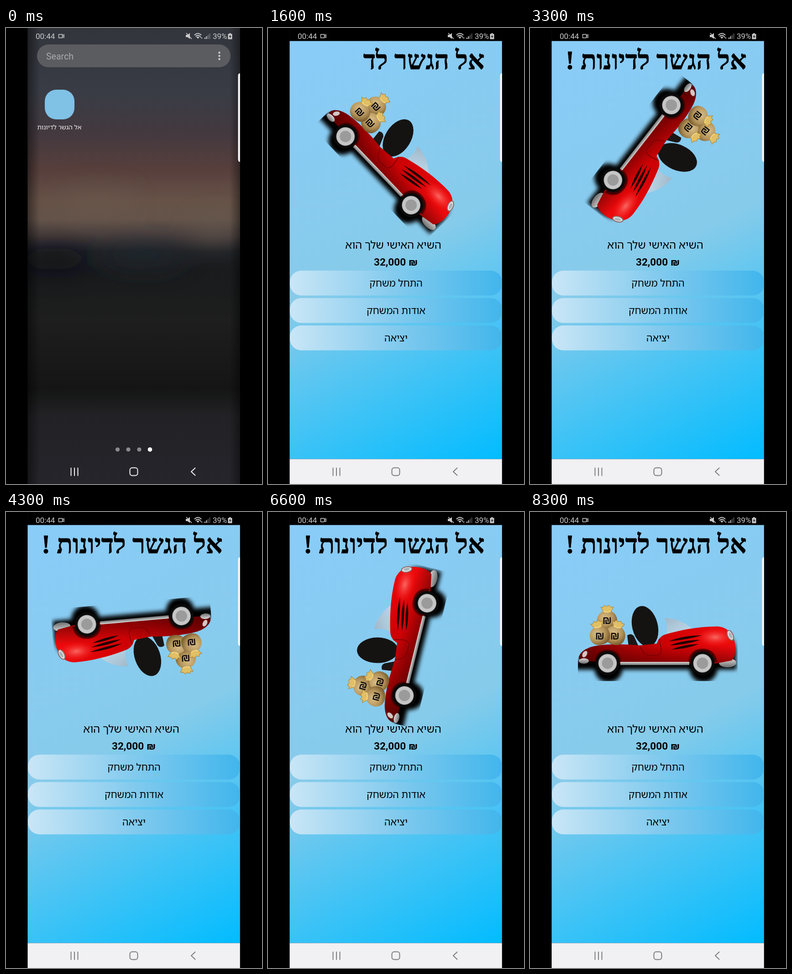
An HTML page for the animation above (8.8 s loop, 561 px wide and 998 px high).

```html
<!DOCTYPE html>
<html lang="he">
<head>
<meta charset="utf-8">
<title>Phone game start screen</title>
<style>
html, body { margin: 0; width: 100%; height: 100%; overflow: hidden; background: #000; }
svg { display: block; width: 100vw; height: 100vh; }
text { font-family: Roboto, "Open Sans", "Noto Sans Hebrew", "Liberation Sans", sans-serif; }
.he { direction: rtl; text-anchor: middle; font-family: "Open Sans", "Noto Sans Hebrew", "Liberation Sans", sans-serif; }
.btn { font-size: 21.4px; font-weight: 500; }
.line { fill: none; stroke-width: 2; stroke-linecap: round; stroke-linejoin: round; }
#title { direction: rtl; text-anchor: start; font: bold 57px "Liberation Serif", "Noto Serif", serif; stroke: #000; stroke-width: .8; }
.coin text { font: bold 23px "Liberation Sans", "DejaVu Sans", sans-serif; text-anchor: middle; fill: #0b0b0b; }
</style>
</head>
<body>
<svg viewBox="0 0 561 998" preserveAspectRatio="none">
<defs>
  <linearGradient id="dusk" x2="0" y2="1">
    <stop offset="0" stop-color="#32353c"/>
    <stop offset=".14" stop-color="#393c45"/>
    <stop offset=".23" stop-color="#43393f"/>
    <stop offset=".31" stop-color="#573f3c"/>
    <stop offset=".38" stop-color="#675348"/>
    <stop offset=".42" stop-color="#64544a"/>
    <stop offset=".455" stop-color="#493f3e"/>
    <stop offset=".49" stop-color="#1f2226"/>
    <stop offset=".53" stop-color="#191b1d"/>
    <stop offset=".64" stop-color="#1d1e1d"/>
    <stop offset=".79" stop-color="#141514"/>
    <stop offset=".85" stop-color="#222125"/>
    <stop offset="1" stop-color="#26252b"/>
  </linearGradient>
  <linearGradient id="edge">
    <stop offset="0" stop-color="#000" stop-opacity=".45"/>
    <stop offset=".06" stop-color="#000" stop-opacity="0"/>
    <stop offset=".95" stop-color="#000" stop-opacity="0"/>
    <stop offset="1" stop-color="#000" stop-opacity=".4"/>
  </linearGradient>
  <linearGradient id="sky" gradientUnits="userSpaceOnUse" x1="48" y1="29" x2="513" y2="943">
    <stop offset="0" stop-color="#89ccf9"/>
    <stop offset=".5" stop-color="#87cbea"/>
    <stop offset="1" stop-color="#02bcff"/>
  </linearGradient>
  <linearGradient id="pill">
    <stop offset="0" stop-color="#c9e6f6"/>
    <stop offset=".5" stop-color="#82caee"/>
    <stop offset="1" stop-color="#41b6ec"/>
  </linearGradient>
  <linearGradient id="paint">
    <stop offset="0" stop-color="#6d0000"/>
    <stop offset=".3" stop-color="#a90204"/>
    <stop offset=".6" stop-color="#d40205"/>
    <stop offset="1" stop-color="#ef0a0c"/>
  </linearGradient>
  <linearGradient id="shade" x2="0" y2="1">
    <stop offset=".5" stop-color="#300" stop-opacity="0"/>
    <stop offset="1" stop-color="#300" stop-opacity=".5"/>
  </linearGradient>
  <radialGradient id="shine">
    <stop offset="0" stop-color="#ff8078" stop-opacity=".8"/>
    <stop offset="1" stop-color="#f22" stop-opacity="0"/>
  </radialGradient>
  <linearGradient id="steel" x2="0" y2="1">
    <stop offset="0" stop-color="#d8d8d8"/>
    <stop offset="1" stop-color="#6e6e6e"/>
  </linearGradient>
  <linearGradient id="glass" x2="1" y2="1">
    <stop offset="0" stop-color="#a0b7c8"/>
    <stop offset="1" stop-color="#cfe2ee" stop-opacity=".75"/>
  </linearGradient>
  <radialGradient id="sack" cx=".38" cy=".35" r=".7">
    <stop offset="0" stop-color="#d9bd86"/>
    <stop offset=".6" stop-color="#b3935a"/>
    <stop offset="1" stop-color="#77592c"/>
  </radialGradient>
  <filter id="soft" x="-40%" y="-60%" width="180%" height="220%"><feGaussianBlur stdDeviation="5"/></filter>
  <filter id="haze" x="-60%" y="-100%" width="220%" height="300%"><feGaussianBlur stdDeviation="28"/></filter>
  <clipPath id="screen"><path d="M47.500 0H512.800V998H47.500Z"/></clipPath>
  <clipPath id="frame"><path d="M105 198H455V370H105Z"/></clipPath>
  <path id="body" d="M107 321C107 309 119 299 139 294C170 288 205 289 240 292L278 288C282 276 288 270 300 267C332 258 372 250 412 250.500C433 252 446 268 449 288C451 304 450 316 442 325L404 332H196L140 327C126 327 112 328 107 321Z"/>
  <g id="wheel">
    <circle r="26.500" fill="#0a0a0a"/>
    <circle r="20.500" fill="#8c8c8c"/>
    <circle r="19.500" fill="#c6c6c6"/>
    <circle r="12.500" fill="#9b9b9b"/>
  </g>
  <g id="bag">
    <path d="M-8-17L-14-28L-9-27L-6-32L-1-29L4-32L8-28L14-28L8-17Z" fill="#e0bf66" stroke="#a97f2c"/>
    <path d="M-8-19C-19-14-24-5-22 6C-20 17-10 22 0 22C12 22 21 16 22 5C23-6 18-15 8-19Z" fill="url(#sack)"/>
    <path d="M-8-19Q0-15 8-19" fill="none" stroke="#f0d27a" stroke-width="3"/>
  </g>
  <g id="nav" class="line">
    <path d="M142.500 963V979.500M150 963V979.500M157.500 963V979.500M414.500 963L406 971L414.500 979"/>
    <rect x="271.500" y="962.500" width="17" height="17" rx="5"/>
  </g>
</defs>

<rect width="561" height="998"/>
<g clip-path="url(#screen)">
  <g id="home">
    <rect x="47" width="466" height="998" fill="url(#dusk)"/>
    <g filter="url(#haze)" opacity=".7">
      <ellipse cx="105" cy="505" rx="80" ry="26" fill="#101112"/>
      <ellipse cx="300" cy="497" rx="95" ry="25" fill="#222a33"/>
      <ellipse cx="455" cy="440" rx="45" ry="24" fill="#665b50"/>
      <ellipse cx="200" cy="375" rx="80" ry="18" fill="#6d5b51"/>
    </g>
    <rect x="47" width="466" height="998" fill="url(#edge)"/>
    <rect x="68" y="36" width="424" height="50" rx="25" fill="#5b5c60"/>
    <text x="88" y="68.500" font-size="19.500" fill="#aaaaac">Search</text>
    <g fill="#d0d0d0"><circle cx="467.500" cy="54" r="2.200"/><circle cx="467.500" cy="61" r="2.200"/><circle cx="467.500" cy="68" r="2.200"/></g>
    <rect x="85" y="135" width="65" height="65" rx="25" fill="#80c1e6"/>
    <text class="he" x="117" y="222" font-size="14" fill="#f2f2f2">אל הגשר לדיונות</text>
    <g fill="#8b8a8e"><circle cx="244.500" cy="922.500" r="4.600"/><circle cx="268" cy="922.500" r="4.600"/><circle cx="292" cy="922.500" r="4.600"/></g>
    <circle cx="315.500" cy="922.500" r="4.800" fill="#fff"/>
    <use href="#nav" stroke="#f2f2f2"/>
  </g>

  <g id="app">
    <rect x="47" width="466" height="29"/>
    <rect x="47" y="28.500" width="466" height="915" fill="url(#sky)"/>
    <rect x="47" y="943.500" width="466" height="55" fill="#f1f0f3"/>
    <use href="#nav" stroke="#7d7d80"/>
    <text id="title" x="474.500" y="90"></text>

    <g id="car"><g clip-path="url(#frame)">
      <g filter="url(#soft)" transform="translate(2 11)">
        <use href="#body"/><circle cx="170" cy="331" r="31"/><circle cx="378" cy="331" r="31"/><path d="M97 314H450V334H97Z"/>
      </g>
      <path d="M213 270Q222 264 228 272L238 294H216Z" fill="#1b1717"/>
      <path d="M295 232Q332 232 360 260L298 272Q303 250 295 232Z" fill="url(#glass)"/>
      <ellipse cx="252" cy="250" rx="28" ry="45" transform="rotate(-14 252 250)" fill="#151312"/>
      <ellipse cx="433" cy="330" rx="19" ry="10" fill="url(#steel)"/>
      <use href="#body" fill="url(#paint)"/>
      <use href="#body" fill="url(#shade)"/>
      <ellipse cx="406" cy="274" rx="42" ry="21" fill="url(#shine)"/>
      <path d="M240 292L248 307Q252 314 264 314H280Q289 311 287 296L283 278" fill="none" stroke="#780003" stroke-width="1.500"/>
      <path d="M304 283Q335 270 377 270Q342 280 304 283ZM306 292Q335 280 373 280Q340 291 306 292ZM310 301Q338 289 370 289Q342 300 310 301Z" fill="#240304"/>
      <path d="M140 326Q144 301 170 301Q196 301 201 328M347 329Q351 300 378 300Q405 300 410 328" fill="#400" stroke="#730002" stroke-width="2"/>
      <path d="M198 328H349V335H198Z" fill="url(#steel)"/>
      <ellipse cx="118" cy="326" rx="11" ry="6" fill="url(#steel)"/>
      <ellipse cx="120" cy="311" rx="5" ry="8" transform="rotate(32 120 311)" fill="#d7c5c5" stroke="#733"/>
      <ellipse cx="439" cy="270" rx="6" ry="11.500" transform="rotate(-24 439 270)" fill="#ddd" stroke="#8d6868" stroke-width="2"/>
      <ellipse cx="439.500" cy="270" rx="3" ry="7" transform="rotate(-24 439.500 270)" fill="#a8b3b9"/>
      <use href="#wheel" x="170" y="331"/>
      <use href="#wheel" x="378" y="331"/>
      <use href="#bag" transform="translate(169 236)"/>
      <use href="#bag" transform="translate(187 269) rotate(14)"/>
      <use href="#bag" transform="translate(153 269) rotate(-14)"/>
      <g class="coin"><text x="169" y="245">₪</text><text x="186" y="279">₪</text><text x="153" y="279">₪</text></g>
    </g></g>

    <text class="he" x="274.500" y="483" font-size="23.500" font-weight="500">השיא האישי שלך הוא</text>
    <text x="232" y="519.500" font-size="22.500" font-weight="600">32,000</text>
    <text x="318" y="519.500" font-size="22" font-weight="700" text-anchor="middle">₪</text>
    <g fill="url(#pill)">
      <rect x="48" y="531" width="465" height="54.500" rx="25"/>
      <rect x="48" y="591" width="465" height="54.500" rx="25"/>
      <rect x="48" y="651" width="465" height="54.500" rx="25"/>
    </g>
    <text class="he btn" x="280.500" y="566">התחל משחק</text>
    <text class="he btn" x="280.500" y="626">אודות המשחק</text>
    <text class="he btn" x="280.500" y="686">יציאה</text>
  </g>

  <g fill="#cbcbcd">
    <text x="65" y="24" font-size="17">00:44</text>
    <path d="M115.500 14H123.500V21.500H115.500ZM123.500 17L127 14.500V21L123.500 18.500" fill="none" stroke="#cbcbcd" stroke-width="1.400"/>
    <path d="M394 15H398L403 11V24L398 20H394Z"/>
    <path d="M395 11L407 24" stroke="#cbcbcd" stroke-width="1.500"/>
    <path d="M413.500 15Q420.500 8.500 427.500 15M416 18Q420.500 14 425 18M418.500 20.500Q420.500 19 422.500 20.500" class="line" stroke="#cbcbcd"/>
    <path d="M419 21H422L420.500 24ZM425 21L426.500 18L428 21ZM427.500 21L429 24L430.500 21Z"/>
    <path d="M435 21H437V24H435ZM438.500 18H440.500V24H438.500Z"/>
    <path d="M442 15H444V24H442ZM445.500 12H447.500V24H445.500Z" opacity=".4"/>
    <text x="453" y="24" font-size="17">39%</text>
    <path d="M489 11.500H493V13H495.500V24.500H486.500V13H489Z"/>
    <path d="M492 14L488.500 19.500H491L490 23L494 18H491.500Z" fill="#222"/>
  </g>
  <path d="M513 99Q508.500 99 508.500 105V287Q508.500 293 513 293Z" fill="#f6f6f6"/>
</g>
</svg>
<script>
const LOOP = 8800, STEP = 100, OPEN = 400, READY = 600;
const TITLE = "אל הגשר לדיונות !";
const TURN = [[660, 0], [800, 6.9], [2400, 85.6], [4300, 175], [5400, 231.9], [6600, 283.8], [8300, 360]];
const $ = id => document.getElementById(id);
const app = $("app"), car = $("car"), title = $("title");
const clamp = (v, lo, hi) => Math.min(hi, Math.max(lo, v));

function angleAt(t) {
  let i = 1;
  while (i < TURN.length - 1 && t > TURN[i][0]) i++;
  const [t0, a0] = TURN[i - 1], [t1, a1] = TURN[i];
  return a0 + (a1 - a0) * clamp((t - t0) / (t1 - t0), 0, 1);
}

function draw(t) {
  // The app window grows out of its launcher icon.
  const p = clamp((t - OPEN) / (READY - OPEN), 0, 1);
  const s = 0.14 + 0.86 * p;
  app.setAttribute("display", p > 0 ? "inline" : "none");
  app.setAttribute("opacity", p);
  app.setAttribute("transform", `translate(${(1 - s) * 117} ${(1 - s) * 168}) scale(${s})`);
  car.setAttribute("transform", `rotate(${angleAt(t)} 279.5 284)`);
  title.textContent = TITLE.slice(0, clamp(Math.floor((t - READY) / STEP), 0, TITLE.length));
}

const start = performance.now();
function tick(now) {
  const t = Math.max(0, now - start) % LOOP;
  draw(Math.min(Math.floor(t / STEP) * STEP, 8300));
  requestAnimationFrame(tick);
}
draw(0);
requestAnimationFrame(tick);
</script>
</body>
</html>
```
